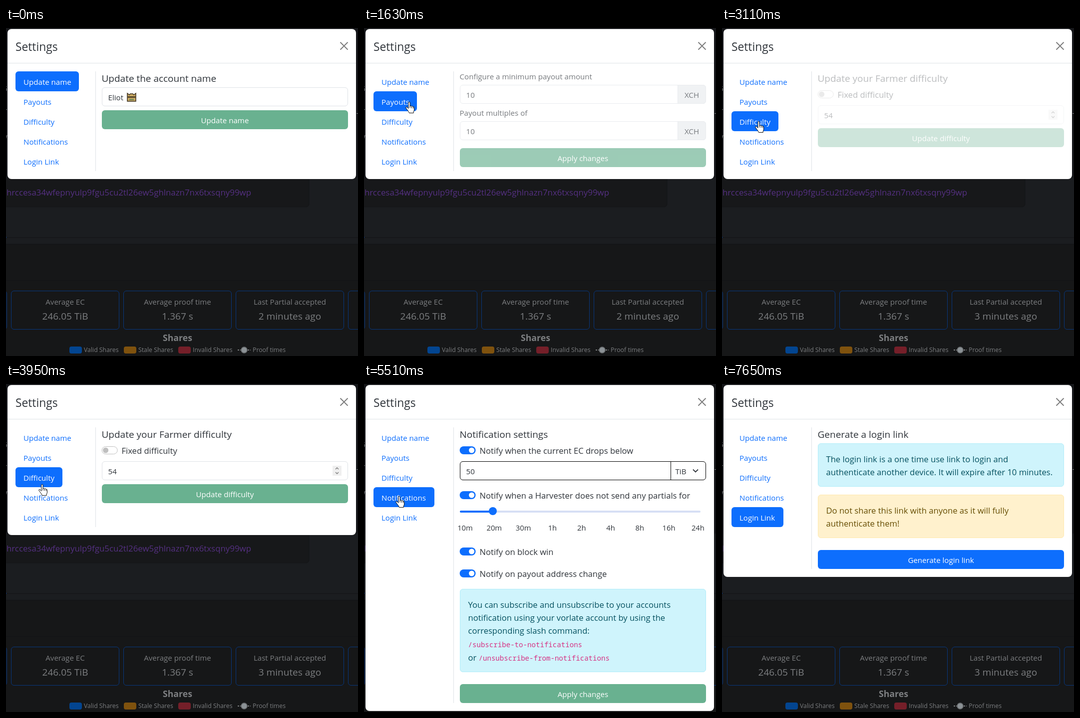
Write an HTML page that moves like this. It is 705x658 px and loops after 8590 ms.

```html
<!DOCTYPE html>
<html lang="en">
<head>
<meta charset="utf-8">
<title>Settings</title>
<style>
html, body { margin: 0; width: 100%; height: 100%; overflow: hidden; background: #1b1d20; }
svg { display: block; width: 100%; height: 100%; font-family: "Open Sans", "Noto Sans", sans-serif; }
.code { font-family: "Noto Sans Mono", "DejaVu Sans Mono", monospace; }
</style>
</head>
<body>
<svg id="stage" viewBox="0 0 705 658"></svg>
<script>
const LOOP = 8590, FADE = 150;
const BLUE = '#0d6efd', GREEN = '#69b190', INK = '#2f343a', LINE = '#dee2e6', DIM = '#7c7e80';
const SMALL = 15.1, MEDIUM = 16.6, LARGE = 19;

// Each tab: label, pill width, dialog bottom, click time, time its pane starts to appear
const tabs = [
  ['Update name', 127, 303, -1000, -800],
  ['Payouts', 87, 303, 1337, 1533],
  ['Difficulty', 94, 303, 2810, 3063],
  ['Notifications', 122, 656, 4405, 4590],
  ['Login Link', 104, 387, 6370, 6528],
].map(([label, width, bottom, click, show], i) => ({ label, width, bottom, click, show, y: 87 + 40 * i }));

// ---- drawing helpers
const text = (x, y, s, size = SMALL, fill = INK, more = '') =>
  `<text x="${x}" y="${y}" font-size="${size}" fill="${fill}" ${more}>${s}</text>`;
const mid = (x, y, s, size, fill, more = '') => text(x, y, s, size, fill, 'text-anchor="middle" ' + more);
const box = (x, y, w, h, fill, r = 0, more = '') =>
  `<rect x="${x}" y="${y}" width="${w}" height="${h}" rx="${r}" fill="${fill}" ${more}/>`;
const frame = (x, y, w, h, fill, stroke, r = 6) =>
  box(x + .5, y + .5, w - 1, h - 1, fill, r - .5, `stroke="${stroke}"`);
const path = (d, stroke, width = 1, more = '') =>
  `<path d="${d}" fill="none" stroke="${stroke}" stroke-width="${width}" ${more}/>`;
const dot = (x, y, r, fill, more = '') => `<circle cx="${x}" cy="${y}" r="${r}" fill="${fill}" ${more}/>`;

const heading = s => text(191.5, 108, s, LARGE);
const button = (y, s, fill = GREEN) => box(192, y, 493, 38, fill, 6) + mid(438.5, y + 25.5, s, SMALL, '#fff');
const input = (y, s, stroke = LINE) => frame(192, y, 493, 38, '#fff', stroke) + text(204.5, y + 26, s);
const toggle = (y, s, on = true) => (on
  ? box(191.6, y, 32, 16, BLUE, 8) + dot(215.6, y + 8, 5.5, '#fff')
  : frame(191.6, y, 32, 16, '#fff', '#bfbfbf', 8) + dot(199.6, y + 8, 5.5, '#bfbfbf'))
  + text(231.5, y + 15, s, MEDIUM);
const amount = (y, s) => input(y, s)
  + `<path d="M628.5 ${y + .5}H679q5.5 0 5.5 6V${y + 31.5}q0 6-5.5 6H628.5z" fill="#e9ecef" stroke="${LINE}"/>`
  + mid(656.5, y + 26, 'XCH');
const notice = (y, h, fill, stroke, ink, lines) => frame(192, y, 493, h, fill, stroke)
  + lines.map((s, i) => text(208.5, y + 37.5 + 26.4 * i, s, MEDIUM, ink)).join('');
const info = (y, h, lines) => notice(y, h, '#cff4fc', '#b0edf9', '#055160', lines);
const code = (x, y, s) => text(x, y, s, 14.12, '#d63384', 'class="code"');

// ---- page behind the dialog
const stat = (x, label, value, id = '') => frame(x, 527, 217, 78, '#161718', '#07377e')
  + mid(x + 108.5, 555, label, SMALL, DIM) + mid(x + 108.5, 585, value, LARGE, DIM, id);
const legend = (x, s, fill) => box(x, 639, 25, 14, fill, 4) + text(x + 29, 650, s, 12.3, DIM);

const page = box(0, 0, 705, 658, '#1b1d20')
  + box(-10, -10, 617, 369, '#17181a', 6, 'stroke="#131416"')
  + box(0, 0, 705, 300, '#151619')
  + text(-6, 127, '5', SMALL, DIM) + text(-4, 171, 'r', SMALL, DIM) + text(-5, 223, 'y', SMALL, DIM)
  + path('M702 171.5h3', DIM)
  + text(491, 336, 'hrccesa34wfepnyulp9fgu5cu2tl26ew5ghlnazn7nx6txsqny99wp', 16.85, '#553082', 'text-anchor="end"')
  + path('M0 420.5H705', '#121315') + box(0, 419, 1, 2, '#07377e')
  + box(0, 433, 705, 225, '#161718') + path('M0 433.5H705M0 506.5H705', '#121315')
  + stat(-215, '', '') + stat(10, 'Average EC', '246.05 TiB') + stat(235, 'Average proof time', '1.367 s')
  + stat(460, 'Last Partial accepted', '', 'id="ago"') + stat(685, '', '')
  + mid(343.5, 628, 'Shares', 17.7, DIM, 'font-weight="700"')
  + legend(127, 'Valid Shares', '#034590') + legend(236, 'Stale Shares', '#7f520e')
  + legend(345, 'Invalid Shares', '#751f29')
  + path('M464 646h26', DIM, 2, 'stroke-dasharray="3 2"')
  + dot(477, 646, 6, '#8c9296', 'stroke="#66696b" stroke-width="1.5"')
  + text(494, 650, 'Proof times', 12.3, DIM);

// ---- dialog panes
const hours = ['10m', '20m', '30m', '1h', '2h', '4h', '8h', '16h', '24h'];
const panes = [
  heading('Update the account name') + input(119, 'Eliot')
    + `<path d="M243 147V131l4 3 2-2h5l2 2 4-3v16z" fill="#c9a862" stroke="#3b2f1c" stroke-width="1.5"/>`
    + box(244, 137, 15, 3, '#54452a') + box(247, 142, 9, 3, '#7b8a5a')
    + button(165, 'Update name'),

  text(191.5, 103, 'Configure a minimum payout amount') + amount(114, '10')
    + text(191.5, 176, 'Payout multiples of') + amount(187, '10') + button(241, 'Apply changes'),

  heading('Update your Farmer difficulty') + toggle(125, 'Fixed difficulty', false) + input(155, '54')
    + box(654, 164, 18, 20, '#efefef') + path('M660 171l3-3 3 3M660 177l3 3 3-3', '#777', 1.3)
    + button(201, 'Update difficulty'),

  heading('Notification settings') + toggle(125, 'Notify when the current EC drops below')
    + input(155, '50', '#000') + path('M614.5 155v38', '#000') + text(623.5, 181, 'TiB')
    + path('M659 171.5l5 5 5-5', INK, 1.8)
    + toggle(215, 'Notify when a Harvester does not send any partials for')
    + box(192, 254, 482, 4, '#d6dff5', 2) + box(192, 254, 66, 4, BLUE, 2) + dot(258, 255, 8, BLUE)
    + hours.map((s, i) => mid(202.5 + 58.3 * i, 294, s, 14.8)).join('')
    + toggle(328, 'Notify on block win') + toggle(372, 'Notify on payout address change')
    + info(411, 167, ['You can subscribe and unsubscribe to your accounts',
      'notification using your vorlate account by using the', 'corresponding slash command:'])
    + code(208.5, 528, '/subscribe-to-notifications')
    + text(208.5, 555, 'or', MEDIUM, '#055160') + code(229.5, 555, '/unsubscribe-from-notifications')
    + button(602, 'Apply changes'),

  heading('Generate a login link')
    + info(119, 87, ['The login link is a one time use link to login and',
      'authenticate another device. It will expire after 10 minutes.'])
    + notice(222, 87, '#fff1cd', '#ffe9ae', '#664d03',
      ['Do not share this link with anyone as it will fully', 'authenticate them!'])
    + button(333, 'Generate login link', BLUE),
];

const dialog = box(3, 2, 698, 301, '#fff', 8, 'id="dialog"')
  + text(19, 46, 'Settings', 22.8) + path('M669.5 28.5l15 15m0-15l-15 15', '#7f7f7f', 2)
  + path('M3 70.5H701', LINE) + box(179, 87, 1, 200, LINE, 0, 'id="divider"')
  + tabs.map((tab, i) => box(19, tab.y, tab.width, 40, BLUE, 6, `id="pill${i}"`)
    + text(35, tab.y + 27, tab.label, SMALL, BLUE, `id="link${i}"`)).join('')
  + panes.map((s, i) => `<g id="pane${i}">${s}</g>`).join('');

const pointer = `<g id="pointer" fill="#fff" stroke="#000" stroke-linejoin="round">
  <path id="arrow" d="M0 0V16.5L3.8 13 6.3 18.7 8.7 17.7 6.2 12H11.5Z"/>
  <g id="hand" transform="translate(-1.5) scale(.9 1)">
    <path d="M-1.8 13.5V2a1.8 1.8 0 0 1 3.6 0V8.5q3-1 3.6 .6 3-.8 3.5 .9 2.3-.4 2.3 2V16q0 2-1.5 4v2.5H0q-1-3-3.5-5.5-3-3.5-4-5 .5-2.5 3-1.2z"/>
    <path d="M1.8 8.5v4M5.4 9.5v3.5M8.9 10.4v3" fill="none"/>
  </g></g>`;

document.getElementById('stage').innerHTML = page + dialog + pointer;

// ---- motion
const el = id => document.getElementById(id);
const set = (id, name, value) => el(id).setAttribute(name, value);
const clamp = v => Math.min(1, Math.max(0, v));
const ramp = (t, start, length = FADE) => clamp((t - start) / length);
const easeOut = p => 1 - (1 - p) ** 2.5;
const easeIn = p => p ** 1.6;
const easeBoth = p => p * p * (3 - 2 * p);

// Pointer moves: start, end, x, y, easing
const moves = [
  [440, 1110, 92, 148, easeOut],
  [2020, 2620, 75, 187, easeBoth],
  [3740, 4250, 72, 225, easeBoth],
  [5510, 6280, 67, 267, easeBoth],
  [7330, 7650, -22, 311, easeIn],
];

function pointerAt(t) {
  let x = 662, y = 53;
  for (const [start, end, toX, toY, ease] of moves) {
    const p = ease(ramp(t, start, end - start));
    x += (toX - x) * p;
    y += (toY - y) * p;
  }
  return [x, y];
}

function mix(from, to, p) {
  return `rgb(${from.map((v, i) => Math.round(v + (to[i] - v) * p))})`;
}

function draw(t) {
  const [x, y] = pointerAt(t);
  const visible = t >= 440 && t < 7650;
  let overLink = false, bottom = 303;

  tabs.forEach((tab, i) => {
    const leave = tabs[i + 1] ? ramp(t, tabs[i + 1].click) : 0;
    const active = ramp(t, tab.click) - leave;
    const hover = visible && x >= 19 && x < 19 + tab.width && y >= tab.y && y < tab.y + 40;
    overLink = overLink || hover;
    if (t >= tab.click + FADE) bottom = tab.bottom;
    set('pill' + i, 'opacity', active);
    set('link' + i, 'fill', mix(hover ? [10, 88, 202] : [13, 110, 253], [255, 255, 255], active));
    set('pane' + i, 'opacity', ramp(t, tab.show, i === 3 ? 210 : FADE) * (1 - leave));
  });

  set('dialog', 'height', bottom - 2);
  set('divider', 'height', bottom - 103);
  el('ago').textContent = (t < 1680 ? 2 : 3) + ' minutes ago';
  set('pointer', 'transform', `translate(${x.toFixed(1)} ${y.toFixed(1)})`);
  set('pointer', 'visibility', visible ? 'visible' : 'hidden');
  set('arrow', 'opacity', overLink ? 0 : 1);
  set('hand', 'opacity', overLink ? 1 : 0);
}

const begin = performance.now();
function tick() {
  draw((performance.now() - begin) % LOOP);
  requestAnimationFrame(tick);
}
tick();
</script>
</body>
</html>
```
